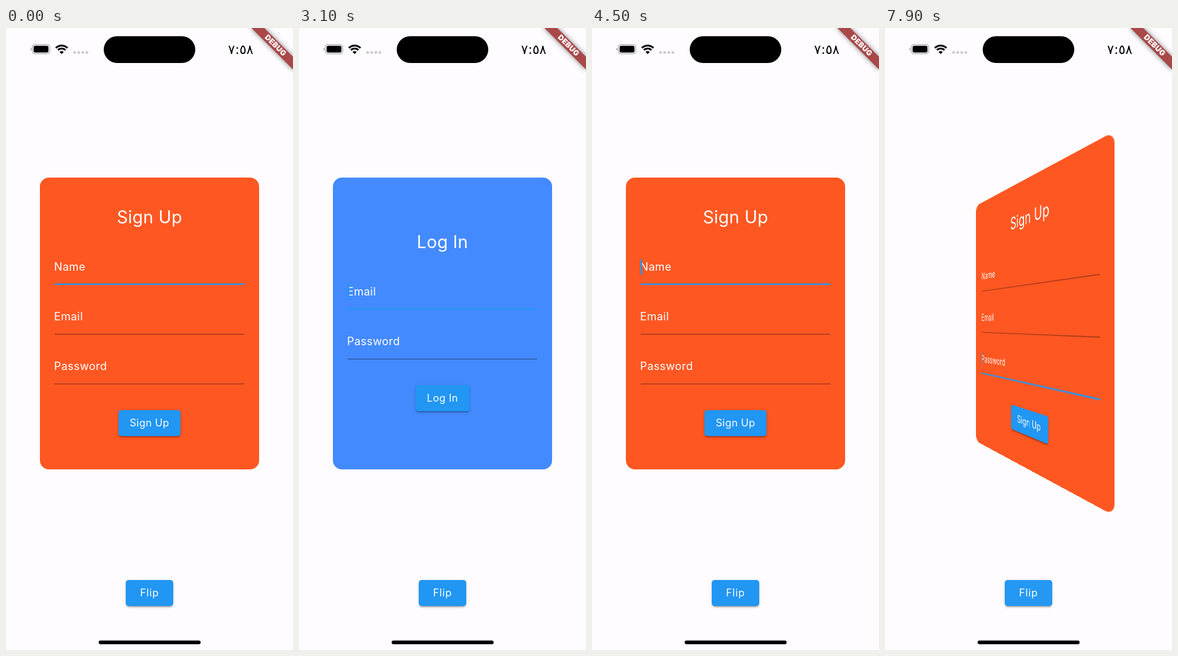
Animation, 508 px wide and 1102 px high, one loop 8 s. Source, as an HTML page:

```html
<!DOCTYPE html>
<html lang="en">
<head>
<meta charset="utf-8">
<title>Flip card</title>
<style>
  html, body { margin: 0; width: 100%; height: 100%; overflow: hidden; background: #fefcff; }
  #stage { position: relative; width: 508px; height: 1102px; overflow: hidden; font-family: Inter, sans-serif; color: #fff; }
  #stage div, #stage svg { position: absolute; }
  .scene { inset: 0; perspective: 646px; perspective-origin: 254px 523px; }
  .card { inset: 0; transform-origin: 254px 523px; }
  .panel { left: 60px; top: 264.5px; width: 388px; height: 517px; border-radius: 16px; }
  .text { line-height: 40px; height: 40px; margin-top: -20px; white-space: pre; }
  .title { left: 60px; width: 388px; text-align: center; font-size: 30.5px; letter-spacing: .3px; }
  .label { left: 85px; font-size: 19.5px; letter-spacing: .45px; }
  .line { left: 86px; top: 0; width: 336px; height: 1px; transform-origin: 0 0; }
  .cursor { left: 86px; width: 2.6px; height: 27px; background: #2196f3; border-radius: 1.3px; }
  .button {
    height: 46.5px; line-height: 46.5px; border-radius: 5px; background: #2196f3; text-align: center;
    font-size: 18px; letter-spacing: .45px;
    box-shadow: 0 4px 1.3px -2.6px rgba(0,0,0,.2), 0 2.6px 2.6px rgba(0,0,0,.14), 0 1.3px 6.5px rgba(0,0,0,.12);
  }
  #flip { left: 212.4px; top: 977.6px; width: 83.2px; letter-spacing: .8px; }
  #banner { left: 508px; top: 0; width: 0; height: 0; transform: rotate(45deg); }
  #banner div {
    left: -51.7px; top: 36.2px; width: 103.4px; height: 15.5px; line-height: 15.5px; text-align: center;
    background: #a94848; box-shadow: 0 0 10px rgba(0,0,0,.5);
    font-size: 13.2px; font-weight: 900; letter-spacing: .3px;
  }
</style>
</head>
<body>
<div id="stage">
  <svg width="508" height="1102">
    <rect x="46.5" y="29.3" width="31" height="16.4" rx="5" fill="none" stroke="#a5a4a6" stroke-width="1.3"/>
    <rect x="48.8" y="31.6" width="26.4" height="11.8" rx="3.2"/>
    <path d="M44.8 35v5q-1.8-.8-1.8-2.5t1.8-2.5z" fill="#a5a4a6"/>
    <g fill="none" stroke="#000" stroke-width="3.2">
      <path d="M88.2 35.4a14.6 14.6 0 0 1 20.6 0"/>
      <path d="M91.9 39.1a9.3 9.3 0 0 1 13.2 0"/>
    </g>
    <path d="M98.5 46.2l-3.6-3.7a5.1 5.1 0 0 1 7.2 0z"/>
    <path d="M119.2 43.4h26" stroke="#c9c8ca" stroke-width="4.4" stroke-dasharray="4.4 2.9"/>
    <rect x="173" y="14.5" width="162" height="47.5" rx="23.75"/>
    <text x="415.5" y="45.5" text-anchor="middle" font-family="DejaVu Sans, sans-serif" font-size="23" direction="ltr">٧:٥٨</text>
    <rect x="164" y="1085.3" width="180.5" height="6.5" rx="3.25"/>
  </svg>
  <div class="scene" id="scene"></div>
  <div class="button" id="flip">Flip</div>
  <div id="banner"><div>DEBUG</div></div>
</div>
<script>
const LOOP = 8000, FLIP = 500, ROW = 88;
const flips = [40, 1270, 2460, 3601, 7717];
// When each sign-up field takes the focus
const focusTimes = [-1000, 5150, 6120, Infinity];
const scene = document.getElementById('scene');
const flipButton = document.getElementById('flip');

const clamp = x => Math.min(1, Math.max(0, x));
const easeIn = x => x ** 1.7;

function add(parent, className, style, text = '') {
  const el = document.createElement('div');
  el.className = className;
  el.textContent = text;
  Object.assign(el.style, style);
  parent.append(el);
  return el;
}

function makeCard(title, names, color, buttonWidth) {
  const el = add(scene, 'card', {});
  const shift = (3 - names.length) * ROW / 2;
  add(el, 'panel', { background: color });
  add(el, 'text title', { top: 334.5 + shift + 'px' }, title);
  const fields = names.map((name, i) => {
    const y = 423 + shift + i * ROW;
    add(el, 'text label', { top: y + 'px' }, name);
    return {
      bottom: y + 32.2,
      line: add(el, 'line', { background: '#000' }),
      blue: add(el, 'line', { background: '#2196f3' }),
      cursor: add(el, 'cursor', { top: y - 13 + 'px' })
    };
  });
  add(el, 'button', {
    left: 254 - buttonWidth / 2 + 'px', top: 676.8 - shift + 'px', width: buttonWidth + 'px'
  }, title);
  return { el, fields };
}

const signUp = makeCard('Sign Up', ['Name', 'Email', 'Password'], '#ff5722', 110.8);
const logIn = makeCard('Log In', ['Email', 'Password'], '#448aff', 96.4);

function blink(t, delay = 0) {
  const phase = ((t - delay) % 1000 + 1000) % 1000;
  return Math.min(clamp(phase / 100), clamp((950 - phase) / 350));
}

// Transforms keep the fractional line weights that layout would round
function setLine(line, bottom, thickness, opacity) {
  line.style.transform = `translateY(${bottom - thickness}px) scaleY(${thickness})`;
  line.style.opacity = opacity;
}

function setField(field, focus, cursor) {
  setLine(field.line, field.bottom, 1.3, .42 * (1 - focus));
  setLine(field.blue, field.bottom, 1.3 + 1.3 * focus, focus);
  field.cursor.style.opacity = focus * cursor;
}

// Signed angle: sign-up leaves with its right side forward, log-in with its left
function pose(t) {
  const started = flips.filter(s => s <= t);
  const p = started.length ? clamp((t - started.at(-1)) / FLIP) : 1;
  const backNow = started.length % 2 === 1;
  const isBack = p < .5 ? !backNow : backNow;
  const turn = 90 * easeIn(p < .5 ? 2 * p : 2 - 2 * p);
  return { isBack, angle: isBack ? turn : -turn };
}

function pressed(t) {
  return Math.max(...flips.map(s => Math.min(clamp((t - s) / 40), clamp((190 - t + s) / 70))));
}

function render(t) {
  const { isBack, angle } = pose(t);
  const card = isBack ? logIn : signUp;
  signUp.el.style.display = isBack ? 'none' : '';
  logIn.el.style.display = isBack ? '' : 'none';
  card.el.style.transform = angle ? `rotateY(${angle}deg)` : 'none';

  signUp.fields.forEach((field, i) => {
    const gained = clamp((t - focusTimes[i]) / 110);
    const lost = clamp((t - focusTimes[i + 1]) / 110);
    setField(field, gained - lost, blink(t, i === 2 ? 150 : 0));
  });
  logIn.fields.forEach((field, i) => setField(field, i ? 0 : 1, blink(t)));

  const glow = .24 * pressed(t);
  flipButton.style.backgroundImage = `linear-gradient(rgba(255,255,255,${glow}), rgba(255,255,255,${glow}))`;
}

const start = performance.now();
function tick() {
  render((performance.now() - start) % LOOP);
  requestAnimationFrame(tick);
}
render(0);
requestAnimationFrame(tick);
</script>
</body>
</html>
```
